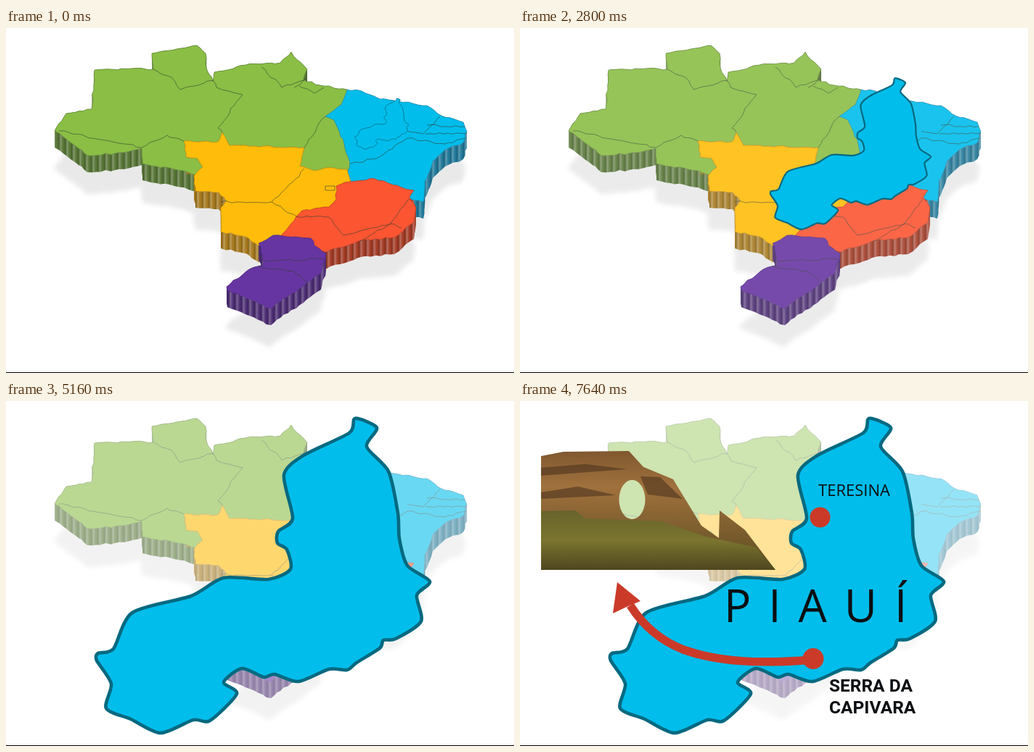
Write an HTML page that moves like this. It is 700 px wide and 476 px high and loops after 8 s.

```html
<!DOCTYPE html>
<html lang="pt">
<head>
<meta charset="utf-8">
<style>
  html, body { margin: 0; width: 100%; height: 100%; overflow: hidden; background: #fff; }
  svg { display: block; width: 100vw; height: 100vh; }
</style>
</head>
<body>
<svg viewBox="0 0 700 476">
  <defs>
    <filter id="soft"><feGaussianBlur stdDeviation="3"/></filter>
    <linearGradient id="ribs" gradientUnits="userSpaceOnUse" x1="0" x2="9" spreadMethod="repeat">
      <stop stop-opacity=".32"/>
      <stop offset=".4" stop-color="#ccc" stop-opacity=".35"/>
      <stop offset="1" stop-opacity=".1"/>
    </linearGradient>
    <linearGradient id="rock" x2="0" y2="1">
      <stop stop-color="#80582f"/>
      <stop offset=".3" stop-color="#a0713d"/>
      <stop offset="1" stop-color="#5c4c20"/>
    </linearGradient>
    <linearGradient id="bush" x2="0" y2="1">
      <stop stop-color="#67632b"/>
      <stop offset=".5" stop-color="#7b7530"/>
      <stop offset="1" stop-color="#4f461e"/>
    </linearGradient>
    <clipPath id="textWipe"><rect id="textClip" y="375" height="70"/></clipPath>
    <clipPath id="arrowWipe"><rect id="arrowClip" y="240" height="140"/></clipPath>
  </defs>

  <g id="map">
    <g id="shadow" fill="#e9e9e9" filter="url(#soft)" transform="translate(-1 53)"></g>
    <g id="walls"></g>
    <g id="tops" stroke-width=".7" stroke-linejoin="round"></g>
    <path id="borders" fill="none" stroke="#30402f" stroke-opacity=".65" stroke-width=".9"/>
  </g>

  <g id="photo">
    <path fill="url(#rock)" fill-rule="evenodd" d="M29 76L60 70 150 69 170 91 211 108 250 172 274 189 275 151 310 178 352 233H29Z
      M154 109a18 27 0 1 0 1 0Z"/>
    <path fill="#4d341e" opacity=".6" d="M29 92L90 87 148 94 29 103ZM29 126L80 118 132 130 29 135ZM166 104L193 105 224 135 176 129Z"/>
    <path fill="url(#bush)" d="M29 152L76 151 90 162 195 166 256 187 325 202 352 233H29Z"/>
  </g>

  <path id="state" fill="#00bdeb" stroke="#066980" stroke-width="4.6" stroke-linejoin="round"/>

  <g fill="#cb3a29">
    <g id="dots"><circle cx="413.5" cy="160.5" r="14"/><circle cx="404" cy="355.5" r="14.5"/></g>
    <g clip-path="url(#arrowWipe)">
      <path d="M404 357C330 363 272 360 225 343 192 330 169 309 152 282" fill="none" stroke="#cb3a29" stroke-width="11.5"/>
      <path d="M134 250L166 276 147 284 128 293Z"/>
    </g>
  </g>
  <g fill="#0b0f12">
    <text id="city" x="411" y="131" font-family="'Open Sans', sans-serif" font-size="22">TERESINA</text>
    <text id="title" x="281" y="304.5" font-family="'Open Sans', sans-serif" font-size="62" letter-spacing="24">PIAUÍ</text>
    <g clip-path="url(#textWipe)" font-family="Roboto, sans-serif" font-weight="700" font-size="24.5">
      <text x="426" y="400.5">SERRA DA</text>
      <text x="426" y="430.5">CAPIVARA</text>
    </g>
  </g>
  <rect y="475" width="700" height="1"/>
</svg>

<script>
const LOOP = 8000, DEPTH = 23;
const $ = id => document.getElementById(id);
const points = s => s.trim().split(/\s+/).map(p => p.split(',').map(Number));

let seed = 7;
const noise = () => (seed = seed * 16807 % 2147483647) / 2147483647 - 0.5;

function add(parent, attrs) {
  const el = document.createElementNS('http://www.w3.org/2000/svg', 'path');
  for (const k in attrs) el.setAttribute(k, attrs[k]);
  $(parent).appendChild(el);
}

// Splits long edges into short uneven steps, like a surveyed line
function rough(pts, size, step = 7) {
  const out = [pts[0]];
  for (let i = 1; i < pts.length; i++) {
    const [x, y] = pts[i - 1], [u, v] = pts[i];
    const n = Math.ceil(Math.hypot(u - x, v - y) / step);
    for (let k = 1; k < n; k++) {
      out.push([x + (u - x) * k / n + noise() * size, y + (v - y) * k / n + noise() * size]);
    }
    out.push(pts[i]);
  }
  return out;
}

// Closed curve through all points, slightly rounded
function smooth(pts, k = 0.13) {
  const n = pts.length, at = i => pts[(i + n) % n];
  let d = 'M' + pts[0];
  for (let i = 0; i < n; i++) {
    const [a, b, c, e] = [at(i - 1), at(i), at(i + 1), at(i + 2)];
    d += `C${b.map((v, j) => v + (c[j] - a[j]) * k)} ${c.map((v, j) => v - (e[j] - b[j]) * k)} ${c}`;
  }
  return d + 'Z';
}

// One upright quad below every edge, all wound the same way
const wall = pts => pts.slice(1).map(([u, v], i) => {
  const [x, y] = pts[i];
  return u > x ? `M${x},${y}V${y + DEPTH}L${u},${v + DEPTH}V${v}Z`
               : `M${x},${y}L${u},${v}V${v + DEPTH}L${x},${y + DEPTH}Z`;
}).join('');

// Later regions cover the loose inner edges of earlier ones
function region(top, side, edge) {
  const pts = points(edge);
  const line = rough([...pts, pts[0]], 2.4);
  const d = 'M' + line.join('L') + 'Z', w = wall(line);
  add('shadow', { d });
  add('walls', { d: w, fill: side });
  add('walls', { d: w, fill: 'url(#ribs)' });
  add('tops', { d, fill: top, stroke: side });
}

region('#8abe45', '#5c8034', `67,142 83,118 118,112 122,58 172,56 203,57 201,35 235,29 263,24
  275,35 277,58 285,74 287,61 330,51 378,48 393,33 415,57 410,72 438,80 470,85 478,190 470,205
  300,190 264,203 232,195 188,187 187,166 150,173 112,176 95,162`);
region('#00bdeb', '#1a83aa', `440,122 452,127 466,160 474,186 470,205 485,225 550,235 575,240
  577,212 588,184 605,168 630,158 635,143 630,130 600,121 580,107 541,101 515,98 490,87 470,85 462,106`);
region('#ffbc0a', '#b98417', `245,156 292,157 298,144 308,162 411,165 405,190 425,197 440,193
  470,195 475,212 460,250 400,280 378,292 348,300 330,288 296,281 296,248 303,238 293,227 261,225
  259,204 271,192 264,180 248,178`);
region('#fb5532', '#b63a20', `400,260 408,252 445,247 455,236 455,218 474,212 508,208 545,220
  562,224 556,233 565,248 562,268 535,289 485,294 442,309 410,300 378,288`);
region('#6635a2', '#4f2a7e', `348,297 368,286 420,290 425,300 441,311 434,338 410,356 378,377
  365,387 330,372 305,362 304,357 335,333 355,327 354,315`);

const border = line => 'M' + rough(points(line), 3).join('L');
$('borders').setAttribute('d', [
  '203,57 228,68 240,85 285,72 290,82 326,92 292,138 298,144',
  '73,142 187,165 222,148 245,156',
  '352,54 380,82 410,72',
  '397,82 414,69',
  '404,80 425,90 438,82',
  '440,122 428,138 411,165',
  '598,122 575,146 553,142',
  '580,134 632,136',
  '578,146 635,145',
  '553,152 605,160 634,152',
  '475,187 510,180 553,152',
  '296,240 366,240 404,205 411,194',
  '366,240 400,260 445,261 465,286 530,270 556,235',
  '488,294 530,270 545,276',
  '356,322 438,318',
  '348,329 395,335 413,350'
].map(border).join('') + 'M440 218h13v6h-13z');

$('state').setAttribute('d', smooth(points(`481,24 511,37 497,63 527,97 540,155 542,190 553,227
  584,249 566,268 572,304 537,328 520,330 515,341 483,361 470,371 445,370 403,387 370,377 355,381
  325,369 300,388 318,404 281,441 258,440 213,458 172,439 138,424 145,390 125,358 127,348 148,342
  174,292 255,269 300,244 362,246 392,232 387,205 374,196 375,180 395,162 383,102 410,75 473,44`)));

const ramp = (t, a, b) => Math.min(1, Math.max(0, (t - a) / (b - a)));
const mix = (a, b, p) => a + (b - a) * p;
const fade = (id, v) => $(id).setAttribute('opacity', v);

// Reveals a clip rectangle from its right edge towards the left
function wipe(id, left, right, p) {
  $(id).setAttribute('x', mix(right, left, p));
  $(id).setAttribute('width', (right - left) * p);
}

function draw(t) {
  const grow = ramp(t, 2000, 4105);
  $('state').setAttribute('transform',
    `translate(${mix(460.5, 0, grow)} ${mix(93.1, 0, grow)}) scale(${mix(0.162, 1, grow)})`);
  fade('map', mix(1, 0.41, ramp(t, 2000, 6500)));

  const appear = ramp(t, 5240, 6420);
  fade('photo', appear);
  fade('dots', appear);
  wipe('textClip', 424, 552, ramp(t, 5320, 6460));

  wipe('arrowClip', 125, 406, ramp(t, 6080, 7600));
  fade('city', ramp(t, 6300, 7000));
  fade('title', ramp(t, 6700, 7560));
}

function tick() {
  draw(performance.now() % LOOP);
  requestAnimationFrame(tick);
}
tick();
</script>
</body>
</html>
```
